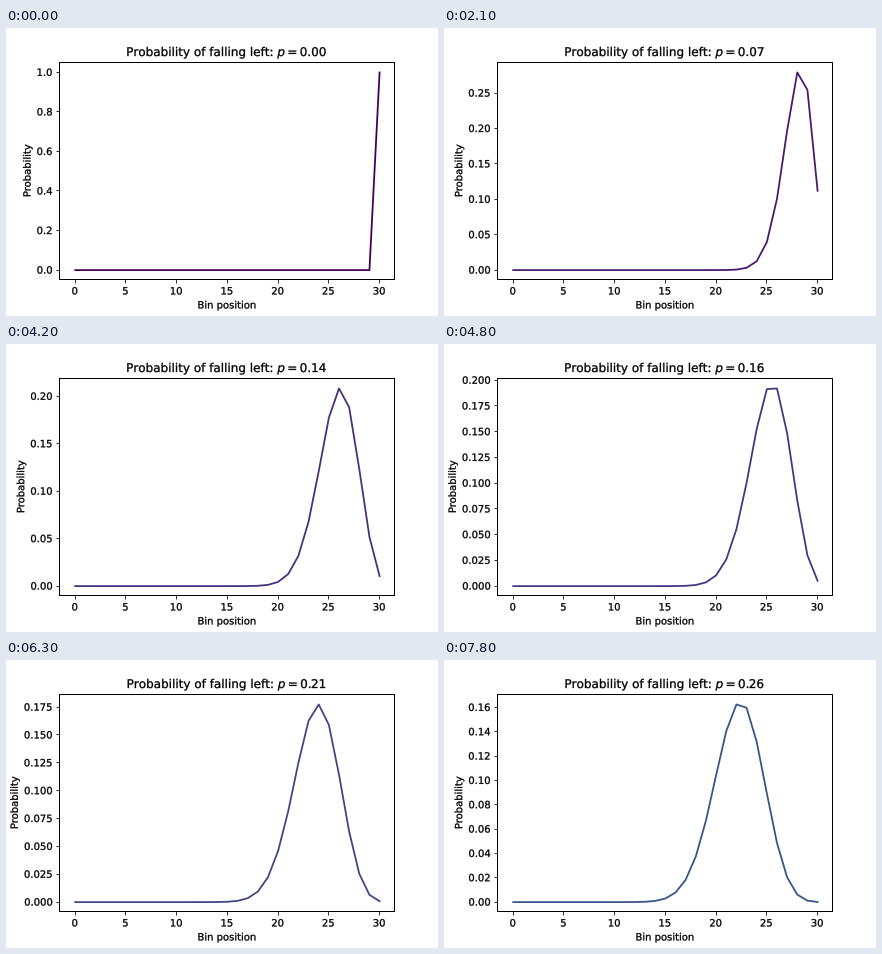
A matplotlib script for the animation above (8000 ms loop, 432 by 288 pixels).

```python
from math import comb

import matplotlib.pyplot as plt
import numpy as np
from matplotlib.animation import FuncAnimation
from matplotlib.patheffects import Stroke
from matplotlib.text import Text
from matplotlib.transforms import ScaledTranslation

WIDTH, HEIGHT, DPI = 432, 288, 72
ROWS = 30
TICK_MS = 100
LOOP_MS = 8000
STEP_MS = 300  # time each probability stays on screen
NUDGE = 0.55   # moves frame and labels up and left onto whole pixels

bins = np.arange(ROWS + 1)
ways = np.array([comb(ROWS, int(k)) for k in bins], dtype=float)
lefts = np.linspace(0, 1, 200)[::2]

plt.rcParams["axes.linewidth"] = 1
fig, ax = plt.subplots(figsize=(WIDTH / DPI, HEIGHT / DPI), dpi=DPI)
dx, dy = NUDGE / WIDTH, NUDGE / HEIGHT
fig.subplots_adjust(left=0.125 - dx, right=0.9 - dx,
                    bottom=0.125 + dy, top=0.88 + dy)
unnudge = ScaledTranslation(NUDGE / DPI, -NUDGE / DPI, fig.dpi_scale_trans)
heavy = [Stroke(linewidth=0.3, foreground="black")]


def binomial(p):
    return ways * (1 - p) ** bins * p ** (ROWS - bins)


def draw(tick):
    p = lefts[tick * TICK_MS // STEP_MS]
    ax.clear()
    line, = ax.plot(bins, binomial(p), color=plt.cm.viridis(p), linewidth=1.8)
    line.set_transform(ax.transData + unnudge)
    ax.set_title(f"Probability of falling left: $p={p:.2f}$")
    ax.set_xlabel("Bin position")
    ax.set_ylabel("Probability")
    for label in fig.findobj(Text):
        label.set_path_effects(heavy)


anim = FuncAnimation(fig, draw, frames=LOOP_MS // TICK_MS, interval=TICK_MS,
                     init_func=lambda: None, repeat=True, repeat_delay=0)
plt.show()
```
